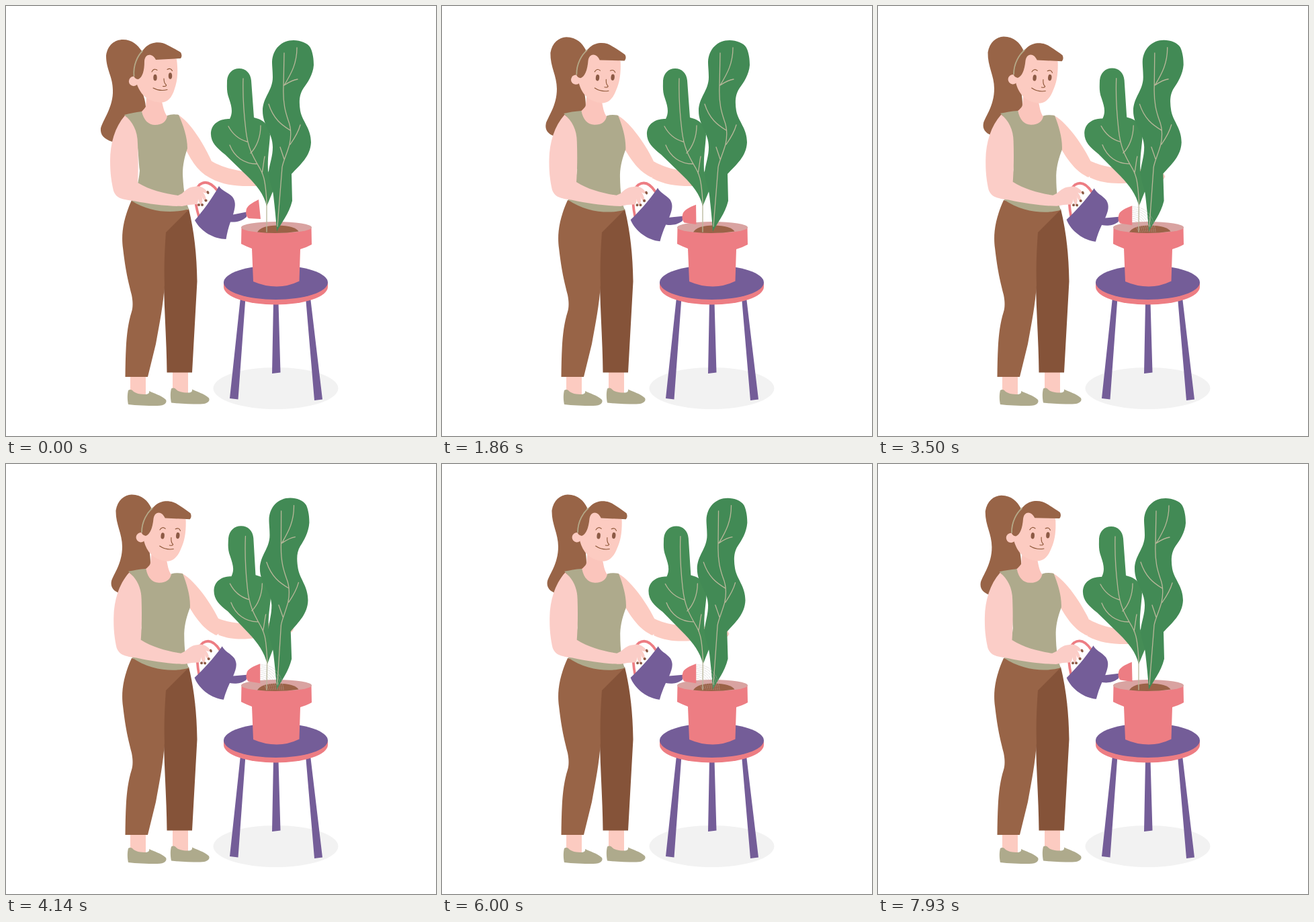
Recreate the animation shown at these times as an HTML page. Size 640 px wide and 640 px high, loop 8 s.

```html
<!DOCTYPE html>
<html lang="en">
<head>
<meta charset="utf-8">
<title>Watering a plant</title>
<style>
  html, body { margin: 0; width: 100%; height: 100%; overflow: hidden; background: #fff; }
  svg { display: block; width: 100%; height: 100%; }
  .skin { fill: #fccbc1; }
  .skin-front { fill: #fbcdc7; }
  .neck { fill: #fbc5bc; }
  .hair { fill: #986447; }
  .dark { fill: #855339; }
  .olive { fill: #aeaa8c; }
  .violet { fill: #745d98; }
  .pink { fill: #ed7d83; }
  .nail { fill: #8c5a45; }
  .line { fill: none; stroke-linecap: round; }
  .vein { stroke: #b9b79a; stroke-width: 1.3; }
  .feature { stroke: #8c5536; stroke-width: 1.1; }
  .water { stroke: #bdb6b3; stroke-width: .6; stroke-dasharray: 5 1.5; }
</style>
</head>
<body>
<svg viewBox="0 0 640 640">
  <ellipse cx="401.5" cy="569" rx="93" ry="31" fill="#f2f2f2"/>

  <g id="table">
    <path class="violet" d="M349 434H356.500L345.500 585.500L333 584ZM398 441H405.500L408.500 545.500L396 547ZM446 434H453L471 585.500L459 587Z"/>
    <path class="pink" d="M324 411V418A77.500 26.500 0 0 0 479 418V411Z"/>
    <ellipse class="violet" cx="401.500" cy="411.500" rx="77.500" ry="25.500"/>
  </g>

  <g id="pot">
    <path class="pink" d="M350.500 329L350 354Q358 358 366 361L368 410Q385 417.500 403 417.500Q420 417.500 436.500 409.500L438 362Q448 359 455 355L454.500 329Z"/>
    <ellipse cx="402.500" cy="329.500" rx="52.500" ry="8.500" fill="#d9a3a1"/>
    <path fill="#9b6247" d="M374 336.500Q380 326.500 404 326.500Q430 327 435.500 335.500Q405 340 374 336.500Z"/>
  </g>

  <path id="upperArm" class="skin"/>
  <path id="forearm" class="skin" d="M306 231C318 238 340 246 370 248L405 250Q414 256 416 262Q414 268 405 268H360C340 268 322 266 304 256Z"/>

  <path id="leftBlade" fill="#458d56"/>
  <path id="leftVeins" class="line vein" d="M388 336V290C386 262 384 252 378 242C368 225 360 212 357 185C354 160 352 140 353 108M331 179C338 192 348 199 359 202M379 178C379 195 373 210 364 219M333 207C340 225 355 235 373 235M385 224C383 234 383 240 381 249"/>
  <path id="rightBlade" fill="#428a55"/>
  <path id="rightVeins" class="line vein" d="M404 328L411 240C412 233 418 220 422 206C425 192 424 180 420 170C416 158 412 145 413 120L414 70M433 62C433 85 425 100 414 118M434 109C426 110 420 114 414 118M391 146C398 168 410 177 423 185M438 177C435 188 430 196 423 206M408 210L414 228"/>
  <g id="water"></g>

  <g id="legs">
    <path class="skin" d="M185 550H208V580H185ZM248 544H271V578H248Z"/>
    <path id="shoe" class="olive" d="M182 572C180 580 181 588 182 593Q200 595 225 595C237 595 240 590 238 586C230 579 221 577 213 573Q214 577 209 578C200 578 192 577 188 572Q185 570 182 572Z"/>
    <use href="#shoe" x="64" y="-2.500"/>
    <path class="dark" d="M272 302C280 335 284 370 284.500 410L277 545.500H239.500C239 500 236 460 235 418L222 400V330Z"/>
    <path class="hair" d="M187 289C172 322 172 345 174 360C178 395 182 410 187 430C189 440 189 448 187 455C179 480 178 510 177.500 552H211L223 503C229 470 234 445 236 415C235 390 236 365 238 337L272 303Z"/>
  </g>

  <path id="tail" class="hair"/>
  <g id="torso">
    <path class="neck" d="M209 135L208 150Q203 157 200 158C203 172 212 178 222 178C233 178 240 172 240 164C235 158 234 150 231 138Z"/>
    <path class="olive" d="M176 162C184 160 192 158 202 157C205 170 212 177 222 177C232 177 239 172 240 163Q248 160 257 162C264 178 270 195 270 212C266 224 263 236 263 250C264 275 267 290 272 302C250 309 215 308 187 290Q197 270 199 245C196 220 198 180 176 162Z"/>
    <g id="head">
      <circle class="skin" cx="190" cy="112" r="7.200"/>
      <path class="skin" d="M195 100L205 72L225 70L254 79C256 95 256 109 251 123C247 137 240 143.500 231 143.500C212 143 201 133 195 117Z"/>
      <path class="hair" d="M190 104C191 84 198 72 207 62C217 52 232 53 240 58C248 62 255 66 260 69Q263 74 260 78L223 80C218 70 207 70 206 82C206 97 203 106 197 109Q192 109 190 104Z"/>
      <path class="line" stroke="#b5a988" stroke-width="1.800" d="M190.500 104C189 88 196 74 203 67"/>
      <ellipse class="nail" cx="222" cy="106.500" rx="2.700" ry="4.700"/>
      <ellipse class="nail" cx="244.500" cy="104" rx="2.700" ry="4.700"/>
      <path class="line feature" d="M217 98Q220 92 225 95.500M240 94.500Q245 91.500 247.500 96.500M235 108Q235 115 238.500 117.500Q239 120 233.500 119.500M219 122Q229 127.500 240 124.500"/>
    </g>
  </g>

  <g id="can">
    <path class="line" stroke="#ed7d83" stroke-width="3.800" d="M287 313C280 290 280 274 288 266C297 259 306 264 314 274"/>
    <path class="violet" d="M317 268C321 275 330 277 337 284C343 292 341 300 338 310.500L358 306.500V314C350 321 342 322 334 321.500C331 330 329 338 327.500 347C310 347 290 336 281 319C292 306 306 288 317 268Z"/>
    <path class="pink" d="M376 288C366 293 358 298 357.500 304Q356 312 361 316L379 317Z"/>
  </g>
  <g id="frontArm">
    <path class="skin-front" d="M177 163C162 180 155 205 155 230C155 250 157 262 160 275C164 286 172 288 190 290C215 295 240 298 262 298L272 296L284 295Q286 293 286 287Q287 294 291 296Q294 290 291 282Q294 291 298 290Q298 283 293 277Q298 280 300 277Q292 266 280 269C274 269 268 273 262 279L256 282C235 279 214 274 196 263C197 245 197 225 196 205C196 185 188 172 177 163Z"/>
    <g class="nail">
      <ellipse cx="300.500" cy="277.500" rx="1.800" ry="2.500" transform="rotate(-25 300.500 277.500)"/>
      <circle cx="297.500" cy="289.500" r="2.100"/>
      <circle cx="292" cy="296" r="2"/>
      <circle cx="287" cy="296" r="2"/>
    </g>
  </g>
</svg>
<script>
  const LOOP = 8000, LEAN_END = 2480, LEAN_BACK = 7090, SWAY_PEAK = 4785;
  const SVG_NS = 'http://www.w3.org/2000/svg';
  const part = Object.fromEntries([...document.querySelectorAll('[id]')].map(el => [el.id, el]));

  // Each shape has two end poses with matching path commands.
  const leanPoses = {
    tail: [
      'M158 202C146 198 140 192 141 182C144 170 160 150 159 125C159 105 149 95 149 74C151 58 162 50 174 50C188 50 196 58 202 67L196 110C200 122 207 135 208 150C206 162 185 172 176 172L160 203Z',
      'M168 192C160 189 155 183 157 174C160 164 173 148 173 123C173 103 163 90 163.5 69C166 54 176 46 187 45.5C203 46 211 55 216 65L208 108C212 120 215 133 215 148C213 160 193 170 185 170L168 193Z'
    ],
    upperArm: [
      'M254 161C270 168 292 200 306 231L312 250L304 256C290 249 278 236 266 210Z',
      'M260 162C278 170 302 202 316 230L321 249L313 255C298 248 286 236 271 210Z'
    ]
  };
  const swayPoses = {
    leftBlade: [
      'M388 298C384 280 372 266 360 254L326 221C313 211 304 202 305 188C307 173 320 168 333 168C338 158 336 150 332 138C328 128 329 120 329 111C330 100 337 93 347 93C357 93 364 100 365 111L369 166C383 169 393 178 393 192C392 210 389 225 390 245C394 256 398 264 398 274Z',
      'M389 298C385 280 374 265 363 253L331 219C318 209 310 201 310.5 187C312 172 324 167 336 167C341 157 338 149 334 137C330 127 331 119 331.5 110C333 99 340 92 350.5 92C361 92 368 99 369 110L372 165C385 168 395 177 395 191C394 209 390 225 391 245C395 256 398 264 398 274Z'
    ],
    rightBlade: [
      'M403 336C402 318 400 300 398 282C397 270 391 262 391 246C393 232 397 224 397 210C397 188 382 178 382 156C382 136 397 126 397 106C397 96 396 90 396 83C397 64 410 51 428 51C438 51 449 55 453 62C457 70 458 80 458 88C457 102 449 114 443 122C436 132 436 144 438 156C441 172 454 182 454 203C453 224 438 236 425 250L426 290C421 310 410 322 403 336Z',
      'M403 336C402 318 400 300 398 282C397 270 391 262 390.5 246C392 232 395 224 395 210C394 188 377 178 377 156C377 136 391.5 126 391.5 106C391.5 96 390.5 90 390.5 83C391 64 404 50.5 422 50.5C432 50.5 441 54 445.5 61C449 69 450 79 450 87C449 102 442 114 437 122C431 132 432 144 434 156C437 172 448.5 182 448.5 203C448 223 435 235 423.5 249L425 290C420 310 410 322 403 336Z'
    ]
  };

  const ease = x => (1 - Math.cos(Math.PI * Math.min(1, Math.max(0, x)))) / 2;

  function mix([from, to], k) {
    const ends = to.match(/[\d.]+/g);
    let i = 0;
    return from.replace(/[\d.]+/g, n => (+n + (ends[i++] - n) * k).toFixed(2));
  }

  function morph(poses, k) {
    for (const name in poses) part[name].setAttribute('d', mix(poses[name], k));
  }

  function place(name, transform) {
    part[name].setAttribute('transform', transform);
  }

  const jets = Array.from({ length: 10 }, (_, i) => {
    const jet = document.createElementNS(SVG_NS, 'path');
    const y = 299 + i * 2.9, x = 413 - i * 2.8;
    jet.setAttribute('class', 'line water');
    jet.setAttribute('d', `M379 ${y}Q${x - 4} ${y} ${x} 336`);
    part.water.append(jet);
    return jet;
  });

  function draw(t) {
    const lean = t < LEAN_BACK ? ease(t / LEAN_END) : 1 - ease((t - LEAN_BACK) / LEAN_END);
    const sway = ease(1 - Math.abs(t - SWAY_PEAK) / (SWAY_PEAK - LEAN_END));

    morph(leanPoses, lean);
    place('torso', `rotate(${2.5 * lean} 230 302)`);
    place('head', `rotate(${3 * lean} 215 157)`);
    place('frontArm', `translate(${4 * lean} ${-0.7 * lean}) rotate(${lean} 230 302)`);
    place('can', `translate(${-0.3 * lean} ${-0.9 * lean}) rotate(${6 * lean} 281 318)`);
    place('forearm', `translate(${10 * lean} 0) rotate(${-9.5 * sway} 294 238)`);

    morph(swayPoses, sway);
    place('leftVeins', `rotate(${1.05 * sway} 388 336)`);
    place('rightVeins', `rotate(${-1.15 * sway} 403 336)`);

    const pouring = t > LEAN_END && t < LEAN_BACK;
    part.water.setAttribute('opacity', pouring ? 0.7 : 0);
    jets.forEach((jet, i) => jet.setAttribute('stroke-dashoffset', -(t * 0.05 + i * 2.3)));
  }

  const start = performance.now();
  function tick() {
    draw((performance.now() - start) % LOOP);
    requestAnimationFrame(tick);
  }
  tick();
</script>
</body>
</html>
```
